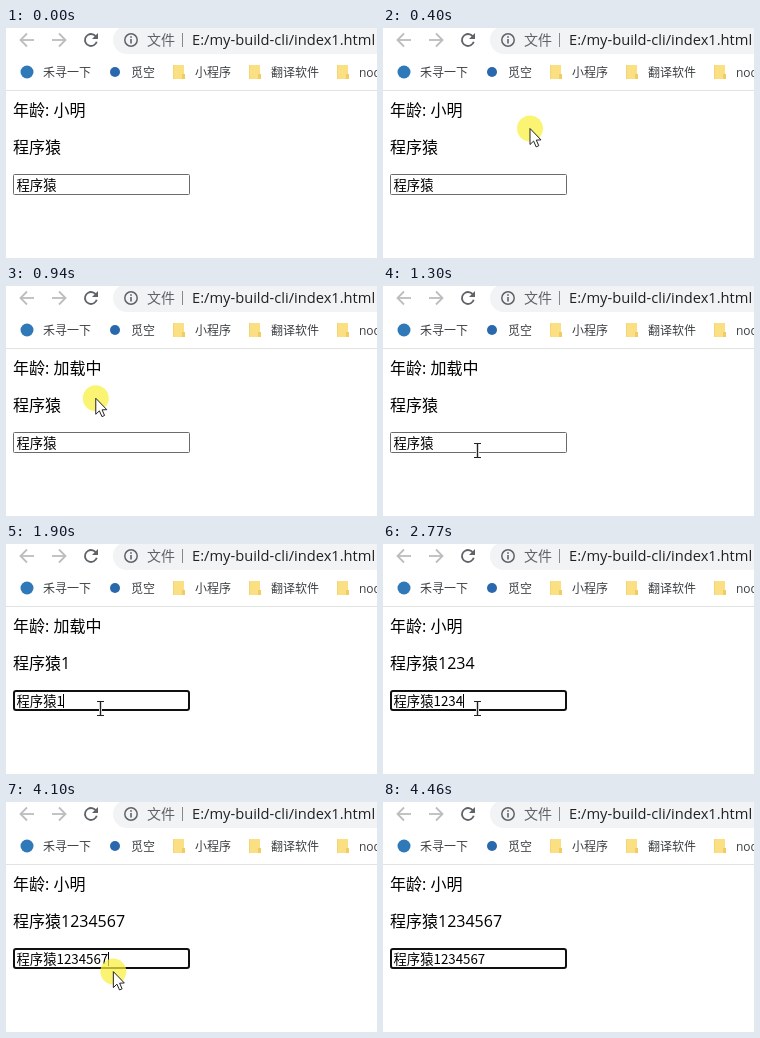
Recreate the animation shown at these times as an HTML page with a canvas. Size 371x230 px, loop 4530 ms.

```html
<!DOCTYPE html>
<html lang="zh-CN">
<head>
<meta charset="utf-8">
<style>
html, body { margin: 0; width: 100%; height: 100%; overflow: hidden; background: #fff; }
canvas { display: block; width: 371px; height: 230px; }
</style>
</head>
<body>
<canvas id="stage"></canvas>
<script>
const W = 371, H = 230, LOOP = 4530;
const CJK = '"Noto Sans CJK SC", "Noto Sans CJK", sans-serif';
const LATIN = '"Open Sans", "Noto Sans", sans-serif';
const MIXED = '"Open Sans", ' + CJK;
const canvas = document.getElementById('stage');
const ctx = canvas.getContext('2d');
const ratio = window.devicePixelRatio || 1;
canvas.width = W * ratio;
canvas.height = H * ratio;

const RELOAD = 750, RENDER = 840, FOCUS = 1370, LOADED = 2770, CARET_OFF = 4390;
const keyTimes = [1900, 2170, 2430, 2700, 3170, 3500, 3900];

const smooth = p => p * p * (3 - 2 * p);
const speedUp = p => p ** 1.5;
const linear = p => p;
const spot = (x, y) => ({ x, y });
const entry = spot(244, 183), turn = spot(50, 18), button = spot(82, 17);
const field = spot(94, 164), exit = spot(290, 246);

// The pointer travels each leg in a number of equal time steps
const legs = [
  { start: 130, end: 540, steps: 6, from: entry, to: turn, ease: smooth },
  { start: 540, end: 680, steps: 2, from: turn, to: button, ease: linear },
  { start: 680, end: 1080, steps: 5, from: button, to: field, ease: smooth },
  { start: 4028, end: 4460, steps: 6, from: field, to: exit, ease: speedUp }
];

function pointerAt(t) {
  const leg = legs.filter(l => t >= l.start).pop();
  if (!leg) return null;
  const u = Math.min(1, (t - leg.start) / (leg.end - leg.start));
  const p = leg.ease(Math.floor(u * leg.steps + 1e-6) / leg.steps);
  return spot(
    leg.from.x + (leg.to.x - leg.from.x) * p,
    leg.from.y + (leg.to.y - leg.from.y) * p
  );
}

function text(str, x, y, size, color, family = CJK) {
  ctx.font = size + 'px ' + family;
  ctx.fillStyle = color;
  ctx.fillText(str, x, y);
}

function rect(x, y, w, h, color) {
  ctx.fillStyle = color;
  ctx.fillRect(x, y, w, h);
}

function disc(x, y, r, color) {
  ctx.fillStyle = color;
  ctx.beginPath();
  ctx.arc(x, y, r, 0, Math.PI * 2);
  ctx.fill();
}

function line(points, color, width) {
  ctx.strokeStyle = color;
  ctx.lineWidth = width;
  ctx.beginPath();
  points.forEach(([x, y]) => ctx.lineTo(x, y));
  ctx.stroke();
}

function navArrow(x, dir) {
  const color = '#bbbdbf';
  line([[x - 7 * dir, 12], [x + 6 * dir, 12]], color, 1.8);
  line([[x, 5.5], [x + 6.5 * dir, 12], [x, 18.5]], color, 1.8);
}

function reloadIcon(hover) {
  if (hover) disc(85, 12, 14, '#eff0f1');
  ctx.strokeStyle = ctx.fillStyle = '#5f6368';
  ctx.lineWidth = 1.8;
  ctx.beginPath();
  ctx.arc(85, 12, 6, 0.3, Math.PI * 1.77);
  ctx.stroke();
  ctx.beginPath();
  ctx.moveTo(92, 5);
  ctx.lineTo(92, 11);
  ctx.lineTo(86, 11);
  ctx.fill();
}

function infoIcon() {
  ctx.strokeStyle = '#5f6368';
  ctx.lineWidth = 1.5;
  ctx.beginPath();
  ctx.arc(125, 12, 6.2, 0, Math.PI * 2);
  ctx.stroke();
  rect(124.2, 11, 1.6, 4.5, '#5f6368');
  rect(124.2, 8.2, 1.6, 1.6, '#5f6368');
}

function folder(x) {
  rect(x, 37, 11, 14, '#fbdf83');
  rect(x + 9, 46, 3, 5, '#f0cc62');
  rect(x, 37, 1, 14, '#f3d477');
}

function toolbar(hover) {
  navArrow(21, -1);
  navArrow(53, 1);
  reloadIcon(hover);
  ctx.fillStyle = '#f1f3f4';
  ctx.beginPath();
  ctx.roundRect(107, -2, 300, 28, 14);
  ctx.fill();
  infoIcon();
  text('文件', 141, 17, 14, '#5f6368');
  rect(176, 5, 1, 14, '#85888c');
  text('E:/my-build-cli/index1.html', 186, 17, 14.66, '#202124', LATIN);

  const ink = '#3c4043';
  disc(21, 44, 6.5, '#2f79b9');
  text('禾寻一下', 37, 49, 12, ink);
  disc(109, 44, 5, '#2a68ad');
  text('觅空', 125, 49, 12, ink);
  folder(167);
  text('小程序', 189, 49, 12, ink);
  folder(243);
  text('翻译软件', 265, 49, 12, ink);
  folder(331);
  text('node', 353, 49, 12, ink, LATIN);
  rect(0, 62, W, 1, '#e0e3df');
}

function page(t) {
  if (t >= RELOAD && t < RENDER) return;
  const count = keyTimes.filter(k => t >= k).length;
  const value = '程序猿' + '1234567'.slice(0, count);
  const loading = t >= RENDER && t < LOADED;
  text('年龄: ' + (loading ? '加载中' : '小明'), 7, 88, 16, '#000', MIXED);
  text(value, 7, 125, 16, '#000', MIXED);

  const focused = t >= FOCUS;
  ctx.strokeStyle = focused ? '#101010' : '#6b6b6b';
  ctx.lineWidth = focused ? 2 : 1;
  ctx.beginPath();
  if (focused) ctx.roundRect(8, 147, 175, 19, 2);
  else ctx.roundRect(7.5, 146.5, 176, 20, 1);
  ctx.stroke();
  text(value, 10.5, 162, 13.333, '#000');
  if (focused && t < CARET_OFF) {
    rect(Math.round(10 + ctx.measureText(value).width), 150, 1, 14, '#000');
  }
}

function arrow(x, y) {
  disc(x, y, 13, 'rgba(250, 240, 60, 0.72)');
  ctx.beginPath();
  [[0, 0], [0, 16], [3.6, 12.6], [6.2, 18.4], [8.8, 17.2], [6.3, 11.6], [11, 11.4]]
    .forEach(([dx, dy]) => ctx.lineTo(x + dx, y + dy));
  ctx.closePath();
  ctx.fillStyle = '#fff';
  ctx.fill();
  ctx.strokeStyle = '#222';
  ctx.lineWidth = 1;
  ctx.stroke();
}

function beam(x, y) {
  for (const [color, extra] of [['#fff', 1.6], ['#222', 0]]) {
    line([[x + 0.5, y - 7], [x + 0.5, y + 7]], color, 1.4 + extra);
    for (const dy of [-7, 7]) {
      line([[x - 3, y + dy + 0.5], [x + 4, y + dy + 0.5]], color, 1 + extra);
    }
  }
}

function drawPointer({ x, y }) {
  const overInput = x >= 7 && x < 184 && y >= 146 && y < 167;
  (overInput ? beam : arrow)(x, y);
}

function draw(t) {
  const at = pointerAt(t);
  const hover = at && Math.hypot(at.x - 85, at.y - 12) < 14;
  ctx.setTransform(ratio, 0, 0, ratio, 0, 0);
  rect(0, 0, W, H, '#fff');
  toolbar(hover);
  page(t);
  if (at) drawPointer(at);
}

const start = performance.now();
function tick() {
  draw((performance.now() - start) % LOOP);
  requestAnimationFrame(tick);
}
tick();
</script>
</body>
</html>
```
